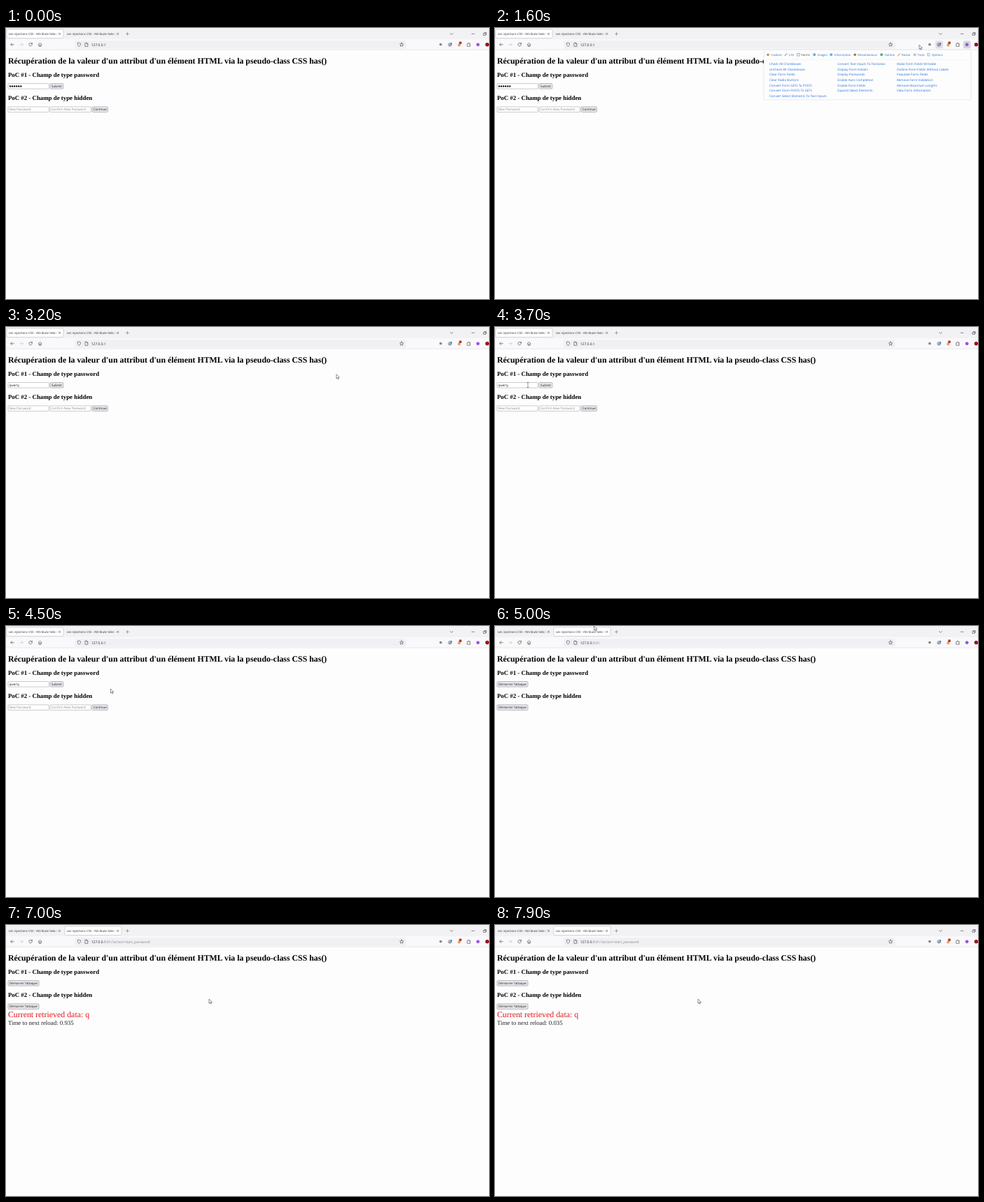
An HTML page that plays this animation: 690x388 px, repeating every 8000 ms.

```html
<!DOCTYPE html>
<html lang="fr">
<head>
<meta charset="utf-8">
<title>Injection CSS</title>
<style>
html, body { margin: 0; width: 100%; height: 100%; overflow: hidden; background: #fdfdfd; }
svg { display: block; width: 100vw; height: 100vh; text-rendering: geometricPrecision; }
text { white-space: pre; }
.ui { font-family: "Open Sans", "Noto Sans", sans-serif; fill: #222; }
.serif { font-family: "Liberation Serif", "Times New Roman", serif; fill: #000; }
.bold { font-weight: bold; }
.line { fill: none; stroke: #4c4c55; stroke-width: .65; stroke-linecap: round; stroke-linejoin: round; }
</style>
</head>
<body>
<svg id="stage" viewBox="0 0 690 388" xmlns="http://www.w3.org/2000/svg"></svg>
<script>
const LOOP = 8000, STEP = 100;
const stage = document.getElementById('stage');

const rect = (x, y, w, h, fill, extra = '') =>
  `<rect x="${x}" y="${y}" width="${w}" height="${h}" fill="${fill}" ${extra}/>`;
const dot = (x, y, r, fill) => `<circle cx="${x}" cy="${y}" r="${r}" fill="${fill}"/>`;
const line = (d, extra = '') => `<path class="line" d="${d}" ${extra}/>`;
const label = (x, y, size, str, extra = '') =>
  `<text class="ui" x="${x}" y="${y}" font-size="${size}" ${extra}>${str}</text>`;
const serif = (x, y, size, str, extra = '') =>
  `<text class="serif" x="${x}" y="${y}" font-size="${size}" ${extra}>${str}</text>`;
const heading = (y, size, str) => `<g class="bold">${serif(2.9, y, size, str)}</g>`;
const group = (id, body) => `<g id="${id}">${body}</g>`;

const field = (x, y, hint = '') =>
  rect(x, y, 58.4, 7.6, '#fff', 'rx="1" stroke="#a8a8b1" stroke-width=".6"') +
  label(x + 1.5, y + 5.4, 4.55, hint, 'style="fill:#85858b"');
const button = (x, y, w, str) =>
  rect(x, y, w, 7.6, '#e9e9ed', 'rx="1.2" stroke="#8f8f9d" stroke-width=".6"') +
  label(x + w / 2, y + 5.4, 4.5, str, 'text-anchor="middle" style="fill:#111"');

function tabs() {
  const fade = (id, x) =>
    `<linearGradient id="${id}" gradientUnits="userSpaceOnUse" x1="${x}" x2="${x + 6}">
      <stop offset="0" stop-color="#2c2c30"/><stop offset="1" stop-color="#2c2c30" stop-opacity="0"/></linearGradient>`;
  const title = (x, id) => label(x, 10, 4.34, 'Les injections CSS - Attribute Selector',
    `style="fill:url(#${id})"`);
  const close = x => line(`M${x - 1.2} 7.2l2.4 2.4m0-2.4l-2.4 2.4`);
  return `<defs>${fade('fadeA', 68.5)}${fade('fadeB', 151.5)}</defs>` +
    rect(0, 0, 690, 16.5, '#f2f2f5') +
    rect(1, 2, 81, 12.6, '#fff', 'id="active" rx="1.5" stroke="#c6c6cc" stroke-width=".7"') +
    title(3.7, 'fadeA') + close(76.5) + title(86.7, 'fadeB') + close(159.7) +
    line('M171.5 8.4h4m-2-2v4', 'style="stroke:#77777f"') + line('M634.5 7.5l2 2l2-2') + line('M665.4 8.4h3.6') +
    line('M682.4 7.6h2.8v2.8h-2.8zM683.4 7.4v-.8h2.8v2.8h-.8');
}

function toolbar() {
  return rect(0, 16.5, 690, 14.7, '#f9f9fb') + rect(0, 30.8, 690, .6, '#dcdce1') +
    rect(98.5, 18.2, 473, 11.3, '#f0f0f4', 'rx="1.5"') +
    line('M11.3 23.7h-4.6m2-2l-2 2l2 2') +
    line('M19.7 23.7h4.6m-2-2l2 2l-2 2', 'style="stroke:#c4c4ca"') +
    line('M37 22.3a2.3 2.3 0 1 0 .4 1.6M37.4 21.2v1.6h-1.6') +
    line('M46.2 23.7l2.4-2.3l2.4 2.3M46.9 23.3v2.8h3.4v-2.8M48.6 26v-1.6') +
    line('M104.4 21.2l2.1.8c0 2.3-.6 3.6-2.1 4.5c-1.5-.9-2.1-2.2-2.1-4.5z') +
    line('M113.3 21.3h2.2l1.4 1.4v3.6h-3.6zM115.4 21.4v1.4h1.4') +
    `<text class="ui" x="121.8" y="25.6" font-size="4.95">127.0.0.1<tspan id="path" fill="#85858d"></tspan></text>` +
    line('M565.2 21l.8 1.8l1.9.2l-1.4 1.3l.4 1.9l-1.7-1l-1.7 1l.4-1.9l-1.4-1.3l1.9-.2z') +
    rect(669, 18.6, 10.6, 10.6, '#d4d4dc', 'id="pressed" rx="1.5"') +
    rect(629.2, 18.6, 10.6, 10.6, '#dedee3', 'id="hover" rx="1.5"') +
    rect(619.3, 21.9, 3.4, 3.4, '#85858d', 'rx=".8"') +
    `<circle class="line" cx="634.2" cy="23.9" r="2.3"/>` + dot(634.2, 24.2, .9, '#4c4c55') + dot(636, 22.2, 1.2, '#2f8be8') +
    dot(647.4, 24.4, 2.1, '#dfa566') + rect(647.3, 19.6, 3.5, 3.5, '#b8392f', 'rx=".7"') +
    line('M659.2 22.3h1.2c-.4-1.5 1.7-1.5 1.3 0h1.5v1.3c-1.3-.3-1.3 1.5 0 1.2v1.5h-4z') +
    dot(674.2, 23.8, 2.4, '#9553e8') + dot(687.4, 23.8, 2.7, '#a00d1e');
}

function popup() {
  const menu = [
    [390, 394.3, 'Cookies', '#c28a4b'], [415.6, 420, 'CSS', '#6d7785'], [433.5, 437.6, 'Forms', '#8b929c'],
    [456.2, 460.5, 'Images', '#63a8cf'], [480.2, 484.8, 'Information', '#5aaee8'],
    [514.2, 518, 'Miscellaneous', '#a8703f'], [552.2, 556.4, 'Outline', '#52ab62'],
    [577, 581, 'Resize', '#e3b53d'], [599.7, 603.6, 'Tools', '#55555e'], [619.7, 624, 'Options', '#5a93d4']];
  const shapes = {
    CSS: (x, c) => line(`M${x - 1.5} 39.7l3-3.2`, `style="stroke:${c};stroke-width:1"`),
    Forms: (x, c) => rect(x - 1.8, 36.5, 3.6, 3.5, '#fff', `stroke="${c}" stroke-width=".7"`),
    Resize: (x, c) => line(`M${x - 1.6} 39.8l3.2-3.2`, `style="stroke:${c};stroke-width:1.3"`),
    Tools: (x, c) => line(`M${x - 1.5} 36.7l3 3.2m-.2-3l-2.6 2.8`, `style="stroke:${c}"`),
    Options: (x, c) => line(`M${x - 1.4} 36.5h1.8l1.2 1.7l-1.2 1.8h-1.8z`, `style="stroke:${c}"`),
    Cookies: (x, c) => dot(x, 38.2, 1.8, c),
    Miscellaneous: (x, c) => dot(x, 38.2, 1.8, c)
  };
  const columns = [
    [392, ['Check All Checkboxes', 'Uncheck All Checkboxes', 'Clear Form Fields', 'Clear Radio Buttons',
      'Convert Form GETs To POSTs', 'Convert Form POSTs To GETs', 'Convert Select Elements To Text Inputs']],
    [489.2, ['Convert Text Inputs To Textareas', 'Display Form Details', 'Display Passwords',
      'Enable Auto Completion', 'Enable Form Fields', 'Expand Select Elements']],
    [574, ['Make Form Fields Writable', 'Outline Form Fields Without Labels', 'Populate Form Fields',
      'Remove Form Validation', 'Remove Maximum Lengths', 'View Form Information']]];
  const box = (x, c) => rect(x - 1.8, 36.6, 3.6, 3.2, c, 'rx=".4"');
  return rect(384, 31.2, 296, 71.6, '#fdfdfe', 'rx="2" stroke="#dedee3" stroke-width=".6"') +
    rect(387, 44.8, 290, .5, '#e8e8ec') +
    rect(431, 34, 21.4, 11.4, '#fdfdfe', 'rx=".8" stroke="#e8e8ec" stroke-width=".4"') +
    menu.map(([x, tx, name, c]) => (shapes[name] || box)(x, c) +
      label(tx, 39.8, 4.25, name, `style="fill:${name === 'Forms' ? '#444' : '#2a70d8'}"`)).join('') +
    columns.map(([x, rows]) => rows.map((row, i) =>
      label(x, 53.1 + i * 7.6, 4.56, row, 'style="fill:#2a70d8"')).join('')).join('');
}

const dots = Array.from({ length: 6 }, (_, i) => dot(6 + i * 3.05, 83.4, 1.2, '#111')).join('');

stage.innerHTML =
  rect(0, 0, 690, 388, '#fdfdfd') + tabs() + toolbar() +
  heading(50.95, 11.86, "Récupération de la valeur d'un attribut d'un élément HTML via la pseudo-class CSS has()") +
  heading(69.7, 8.86, 'PoC #1 - Champ de type password') +
  heading(103, 8.86, 'PoC #2 - Champ de type hidden') +
  group('victim',
    field(3, 79.5) + group('masked', dots) + group('clear', label(4.5, 84.9, 4.55, 'qwerty')) +
    button(63, 79.5, 18.8, 'Submit') +
    field(3, 112.8, 'New Password') + field(63, 112.8, 'Confirm New Password') +
    button(123, 112.8, 22.4, 'Continue')) +
  group('attacker',
    button(3, 79.5, 44, "Démarrer l'attaque") + button(3, 112.8, 44, "Démarrer l'attaque") +
    serif(2.9, 131.8, 11.86, 'Current retrieved data: q', 'id="found" style="fill:#e8141c"') +
    serif(2.9, 128.8, 8.86, '', 'id="timer" style="fill:#222"')) +
  group('popup', popup()) +
  group('status', rect(0, 381, 160, 7, '#f0f0f4', 'stroke="#d8d8de" stroke-width=".4"') +
    label(1.2, 386.2, 4.15, 'moz-extension://f94fe1f9-1bf1-4621-ac0c-28861c0b1c2a/overlay/overlay.html#')) +
  group('arrow', '<path d="M0 0v6.2l1.4-1.3l1 2.2l1-.5l-1-2.1h2z" fill="#fff" stroke="#222" stroke-width=".5"/>') +
  group('hand', '<path d="M-.7 4V.3a.7.7 0 0 1 1.4 0v2.2l2.4.6q.6.2.5 1l-.5 2.6h-3.4l-2-2.3q0-1 1-.6z" fill="#fff" stroke="#444" stroke-width=".45"/>') +
  group('beam', line('M-.9-3.6h1.8M0-3.6v7.2M-.9 3.6h1.8', 'style="stroke:#333;stroke-width:.5"'));

const el = {};
stage.querySelectorAll('[id]').forEach(node => { el[node.id] = node; });
const show = (id, on) => { el[id].style.display = on ? '' : 'none'; };

// Pointer stops: time, x, y
const route = [
  [600, 53, 74], [1200, 673, 22], [1400, 673, 22], [1600, 606, 24.2], [2200, 541, 52], [2300, 541, 52],
  [2700, 506, 66.5], [3100, 506, 66.5], [3700, 47, 83], [3900, 47, 83], [4200, 6, 84], [4600, 176, 91],
  [4700, 176, 91], [5000, 141.5, 0], [5100, 141.5, 0], [5500, 32, 83], [5900, 32, 83],
  [6100, 128, 96], [6400, 290, 106]];

function pointer(t) {
  const i = route.findIndex(p => p[0] > t);
  if (i < 1) return (i ? route[route.length - 1] : route[0]).slice(1);
  const [t0, x0, y0] = route[i - 1], [t1, x1, y1] = route[i];
  const k = (t - t0) / (t1 - t0), e = k * k * (3 - 2 * k);
  return [x0 + (x1 - x0) * e, y0 + (y1 - y0) * e];
}

function draw(t) {
  const within = (a, b) => t >= a && t < b;
  const second = t >= 4900, started = t >= 5900, found = t >= 7000;

  el.active.setAttribute('x', second ? 84 : 1);
  el.path.textContent = started ? ':81/?action=start_password' : second ? ':81' : '';
  show('victim', !second);
  show('attacker', second);
  show('masked', t < 3000);
  show('clear', t >= 3000);
  show('popup', within(1400, 3200));
  show('pressed', within(1200, 3200));
  show('hover', within(1500, 1700));
  show('status', within(2500, 3200));

  show('found', found);
  show('timer', t >= 6000);
  const left = 1 - (t - (found ? 6935 : 5981)) / 1000;
  el.timer.textContent = 'Time to next reload: ' + left.toFixed(3);
  el.timer.setAttribute('y', found ? 142.6 : 128.8);

  const [x, y] = pointer(t);
  const overField = within(3600, 4700) && x > 3 && x < 61 && y > 79 && y < 87;
  const shape = t < 600 ? '' : within(2500, 3200) ? 'hand' : overField ? 'beam' : 'arrow';
  ['arrow', 'hand', 'beam'].forEach(id => {
    show(id, id === shape);
    el[id].setAttribute('transform', `translate(${x} ${y})`);
  });
}

const start = performance.now();
function tick() {
  const t = (performance.now() - start) % LOOP;
  draw(Math.floor(t / STEP) * STEP);
  requestAnimationFrame(tick);
}
tick();
</script>
</body>
</html>
```
